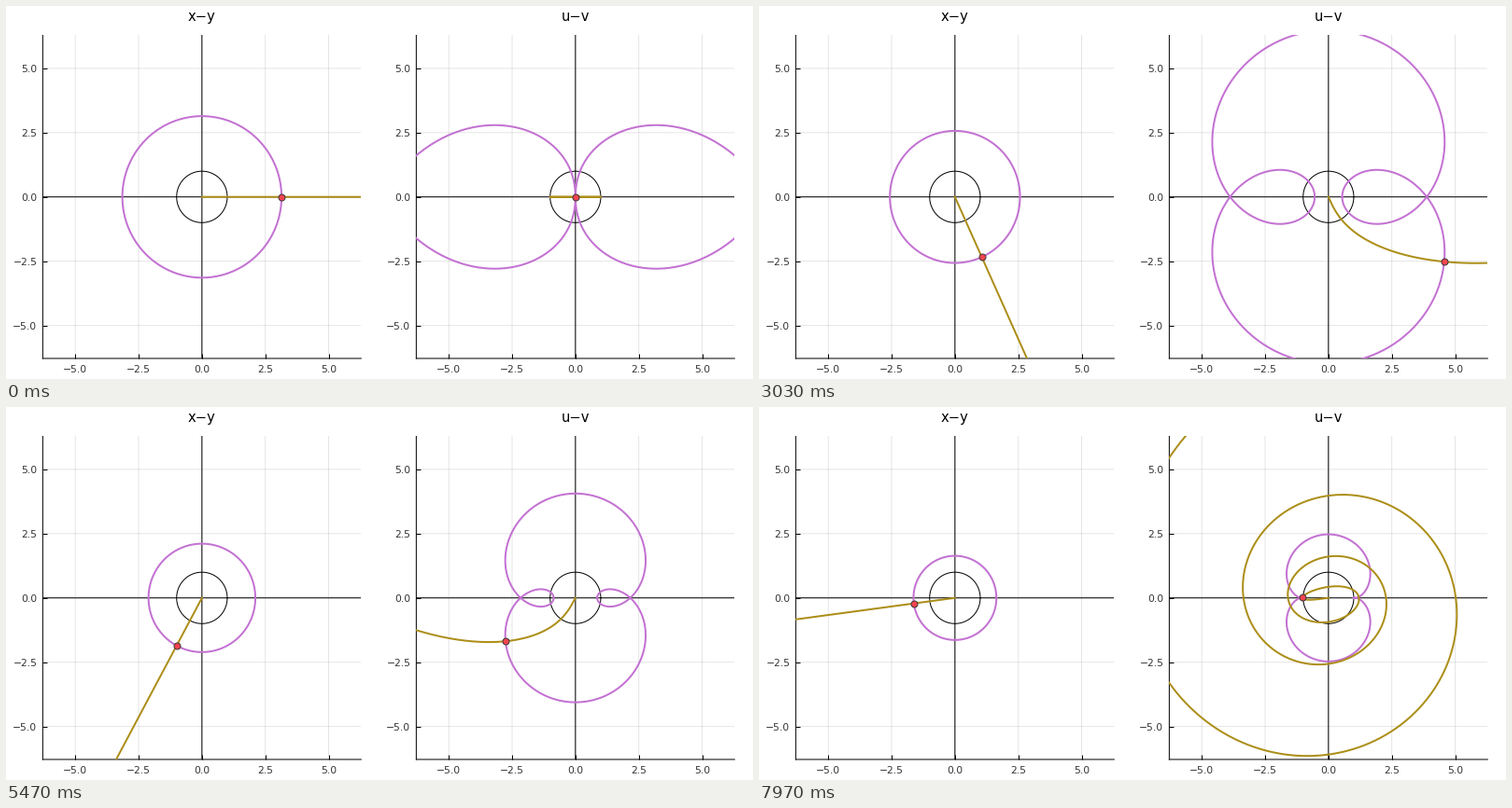
A matplotlib script for the animation above (8000 ms loop, 800 by 400 pixels).

```python
import numpy as np
import matplotlib.pyplot as plt
from matplotlib.animation import FuncAnimation

W, H, DPI = 800, 400, 100
PX = 72 / DPI            # one pixel in points
MM = DPI / 25.4          # one millimetre in pixels
LOOP, TICK = 8000, 20    # ms
POSES = 240              # distinct poses in one loop
STEPS = 499              # steps for a full turn while the radius shrinks to 0
PURPLE, GOLD = "#c371d2", "#ac8e18"
LIM = 2 * np.pi

plt.rcParams["font.family"] = "DejaVu Sans"
plt.rcParams["path.snap"] = False
fig = plt.figure(figsize=(W / DPI, H / DPI), dpi=DPI, facecolor="white")

unit = np.exp(1j * np.linspace(0, 2 * np.pi, 801))
ray = np.linspace(0, 10 * np.pi, 3000)


def make_panel(x0, title):
    left, right = x0 + 10 * MM, x0 + W / 2 - 5 * MM
    bottom, top = 5.6 * MM, H - 8 * MM
    ax = fig.add_axes([left / W, bottom / H,
                       (right - left) / W, (top - bottom) / H])
    ax.set(xlim=(-LIM, LIM), ylim=(-LIM, LIM))
    ticks = [-5, -2.5, 0, 2.5, 5]
    labels = [f"{t:.1f}".replace("-", "\u2212") for t in ticks]
    ax.set_xticks(ticks, labels)
    ax.set_yticks(ticks, labels)
    ax.tick_params(direction="in", length=5 * PX, width=PX, pad=6 * PX,
                   labelsize=10.8 * PX, labelcolor="#333333")
    ax.tick_params(axis="x", pad=7 * PX)
    ax.set_axisbelow(True)
    ax.grid(color="black", alpha=0.1, lw=PX)
    for side in ("top", "right"):
        ax.spines[side].set_visible(False)
    for side in ("left", "bottom"):
        ax.spines[side].set_linewidth(PX)
    fig.text((left + right) / 2 / W, (H - 16) / H, title,
             ha="center", va="baseline", fontsize=14.8 * PX)

    ax.axhline(0, color="black", lw=PX, zorder=2)
    ax.axvline(0, color="black", lw=PX, zorder=2)
    ax.plot(unit.real, unit.imag, color="black", lw=PX, zorder=3)
    ring, = ax.plot([], [], color=PURPLE, lw=2 * PX, zorder=4)
    beam, = ax.plot([], [], color=GOLD, lw=2 * PX, zorder=5)
    dot, = ax.plot([], [], "o", ms=7 * PX, mfc="#f5434f", mec="#3a3a3a",
                   mew=PX, zorder=6)
    return ring, beam, dot


panels = [
    (make_panel(0, "x\u2212y"), lambda z: z),
    (make_panel(W / 2, "u\u2212v"), np.sin),
]


def place(line, w):
    w = w[np.abs(w) < 80]
    line.set_data(w.real, w.imag)


def update(k):
    # poses change on a 10 ms clock, rounded to the nearest tick
    i = (k * TICK + 15) * POSES // LOOP
    radius = np.pi * (1 - i / STEPS)
    heading = np.exp(-2j * np.pi * i / STEPS)
    shapes = radius * unit, ray * heading, np.array([radius * heading])
    artists = []
    for lines, func in panels:
        for line, z in zip(lines, shapes):
            place(line, func(z))
            artists.append(line)
    return artists


anim = FuncAnimation(fig, update, frames=LOOP // TICK, interval=TICK,
                     init_func=lambda: update(0), repeat=True, repeat_delay=0)
plt.show()
```
